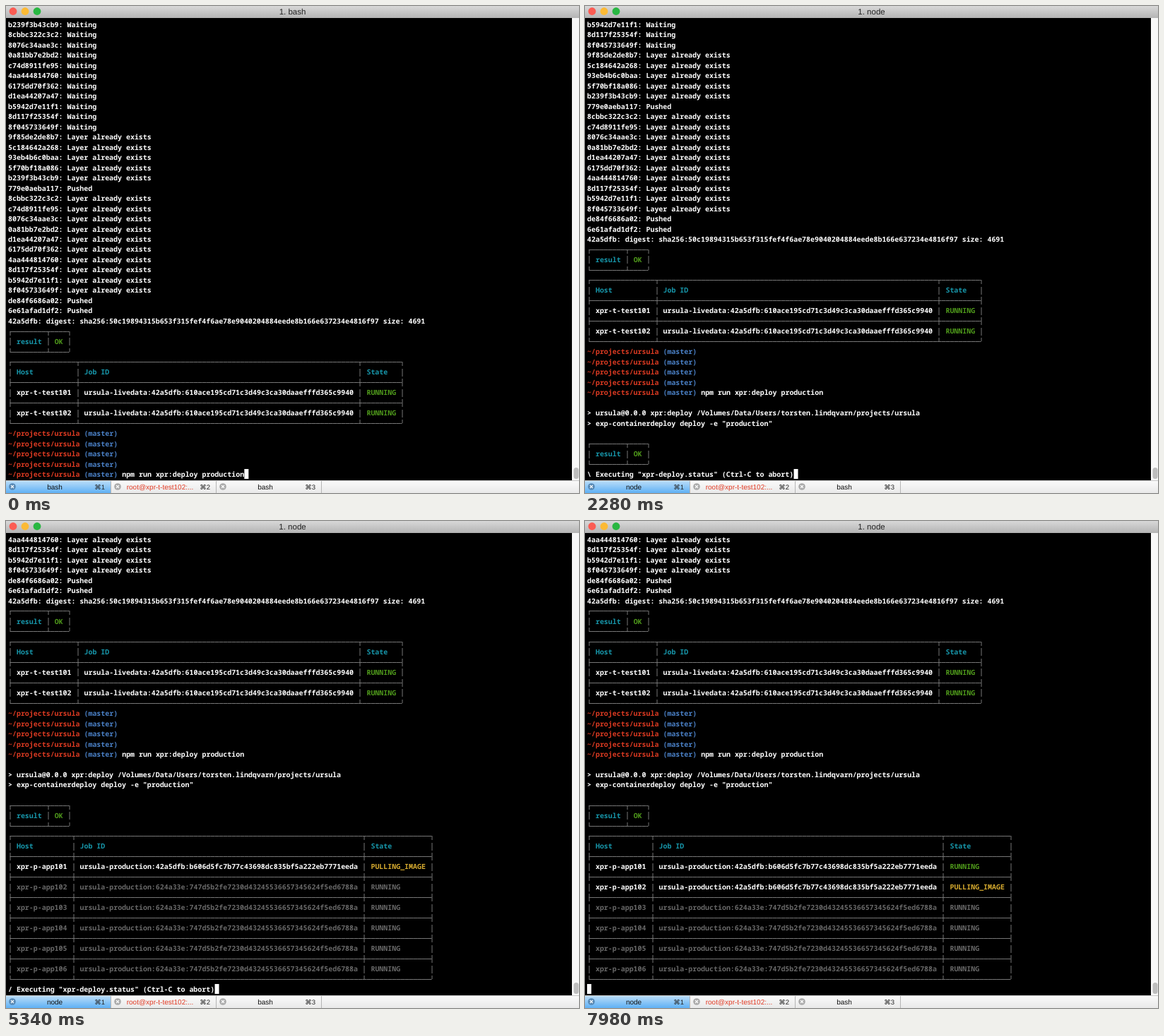
An HTML page with a canvas for the animation above (8000 ms loop, 811 by 690 pixels).

```html
<!DOCTYPE html>
<html lang="en">
<head>
<meta charset="utf-8">
<title>Terminal deploy</title>
<style>
html, body { margin: 0; width: 100%; height: 100%; overflow: hidden; background: #000; }
canvas { display: block; }
</style>
</head>
<body>
<canvas id="stage" width="811" height="690"></canvas>
<script>
const ctx = document.getElementById('stage').getContext('2d');
const LOOP = 8000, ROWS = 45, LEFT = 3, CELL = 5.97, FIRST_ROW = 26, PITCH = 14.49;
const MONO = '600 9.95px "Noto Sans Mono", "DejaVu Sans Mono", monospace';
const WHITE = '#fff', RED = '#dc3a22', BLUE = '#4a80c6', CYAN = '#1797ab',
      GREEN = '#4f9a1b', YELLOW = '#d8ac30', DIM = '#686868', GRID = '#777';

// A line is a list of [text, colour] segments.
const plain = text => [[text, WHITE]];
const layers = (ids, state) => ids.split(' ').map(id => plain(`${id}: ${state}`));

function table(rows) {
  const widths = rows[0].map((_, c) => Math.max(...rows.map(r => r[c][0].length)));
  const rule = ([left, mid, right]) =>
    [[left + widths.map(w => '─'.repeat(w + 2)).join(mid) + right, GRID]];
  const body = rows.map(row => [
    ['│', GRID],
    ...row.flatMap(([text, color], c) => [[` ${text.padEnd(widths[c])} `, color], ['│', GRID]])
  ]);
  return [
    rule('┌┬┐'),
    ...body.flatMap((line, i) => i ? [rule('├┼┤'), line] : [line]),
    rule('└┴┘')
  ];
}

const header = ['Host', 'Job ID', 'State'].map(name => [name, CYAN]);
const resultTable = table([[['result', CYAN], ['OK', GREEN]]]);
const prompt = [['~/projects/ursula ', RED], ['(master) ', BLUE]];
const command = [...prompt, ['npm run xpr:deploy production', WHITE]];

const history = [
  ...layers('b239f3b43cb9 8cbbc322c3c2 8076c34aae3c 0a81bb7e2bd2 c74d8911fe95 4aa444814760 ' +
    '6175dd70f362 d1ea44207a47 b5942d7e11f1 8d117f25354f 8f045733649f', 'Waiting'),
  ...layers('9f85de2de8b7 5c184642a268 93eb4b6c0baa 5f70bf18a086 b239f3b43cb9', 'Layer already exists'),
  ...layers('779e0aeba117', 'Pushed'),
  ...layers('8cbbc322c3c2 c74d8911fe95 8076c34aae3c 0a81bb7e2bd2 d1ea44207a47 6175dd70f362 ' +
    '4aa444814760 8d117f25354f b5942d7e11f1 8f045733649f', 'Layer already exists'),
  ...layers('de84f6686a02 6e61afad1df2', 'Pushed'),
  plain('42a5dfb: digest: sha256:50c19894315b653f315fef4f6ae78e9040204884eede8b166e637234e4816f97 size: 4691'),
  ...resultTable,
  ...table([header, ...['101', '102'].map(n => [
    ['xpr-t-test' + n, WHITE],
    ['ursula-livedata:42a5dfb:610ace195cd71c3d49c3ca30daaefffd365c9940', WHITE],
    ['RUNNING', GREEN]
  ])]),
  prompt, prompt, prompt, prompt, command
];

const banner = [
  [],
  plain('> ursula@0.0.0 xpr:deploy /Volumes/Data/Users/torsten.lindqvarn/projects/ursula'),
  plain('> exp-containerdeploy deploy -e "production"'),
  []
];

// Hosts listed in `states` run the new build; the others still run the old one.
function statusTable(...states) {
  return table([header, ...Array.from({ length: 6 }, (_, i) => {
    const state = states[i], color = state ? WHITE : DIM;
    const job = state ? '42a5dfb:b606d5fc7b77c43698dc835bf5a222eb7771eeda'
                      : '624a33e:747d5b2fe7230d43245536657345624f5ed6788a';
    return [
      ['xpr-p-app10' + (i + 1), color],
      ['ursula-production:' + job, color],
      [state || 'RUNNING', !state ? DIM : state === 'RUNNING' ? GREEN : YELLOW]
    ];
  })]);
}

const started = [...history, ...banner];
const deployed = [...started, ...resultTable];
const pulling = [...deployed, ...statusTable('PULLING_IMAGE')];
const checking = [...deployed, ...statusTable('HEALTHCHECKING')];
const nextHost = [...deployed, ...statusTable('RUNNING', 'PULLING_IMAGE')];

// Each step: start time, finished lines, and the task whose spinner is shown.
const steps = [
  [0, history.slice(0, -1), null, command],
  [180, history],
  [420, started],
  [600, started, 'deploy_async'],
  [1620, deployed, 'status'],
  [2520, pulling],
  [3540, pulling, 'status'],
  [4020, pulling],
  [5040, pulling, 'status'],
  [5520, checking],
  [6570, checking, 'status'],
  [7050, nextHost]
];

function label(text, x, y, font, color, align = 'center') {
  ctx.font = font;
  ctx.fillStyle = color;
  ctx.textAlign = align;
  ctx.fillText(text, x, y);
}

function box(x, y, w, h, color) {
  ctx.fillStyle = color;
  ctx.fillRect(x, y, w, h);
}

function disc(x, y, r, color) {
  ctx.fillStyle = color;
  ctx.beginPath();
  ctx.arc(x, y, r, 0, 7);
  ctx.fill();
}

function shade(y, h, top, bottom) {
  const g = ctx.createLinearGradient(0, y, 0, y + h);
  g.addColorStop(0, top);
  g.addColorStop(1, bottom);
  return g;
}

function drawGrid(text, x, y) {
  [...text].forEach((ch, i) => {
    const cx = Math.round(x + (i + 0.5) * CELL) - 0.5, cy = Math.round(y);
    const x0 = '┌├└│'.includes(ch) ? cx : x + i * CELL;
    const x1 = '┐┤┘│'.includes(ch) ? cx : x + (i + 1) * CELL;
    if (ch !== '│') box(x0, cy, x1 - x0, 1, GRID);
    const up = '│├┼┤└┴┘'.includes(ch) ? 5 : 0, down = '│├┼┤┌┬┐'.includes(ch) ? 6 : 0;
    if (up || down) box(cx, cy - up, 1, up + down, GRID);
  });
}

function drawLine(line, row) {
  const y = FIRST_ROW + row * PITCH;
  let x = LEFT;
  for (const [text, color] of line) {
    if (color === GRID) drawGrid(text, x, y);
    else label(text, x, y + 3.7, MONO, color, 'left');
    x += text.length * CELL;
  }
  return x;
}

function drawTab(x, title, number, active, color = '#111') {
  box(x, 673, 148, 17, active ? shade(673, 17, '#b9dcf8', '#5fb1f5') : shade(673, 17, '#fafafa', '#e9e9e9'));
  box(x + 148, 673, 1, 17, '#b5b5b5');
  disc(x + 9, 681, 4.8, active ? '#5688b4' : '#aaa');
  ctx.strokeStyle = '#fff';
  ctx.lineWidth = 1.2;
  ctx.beginPath();
  ctx.moveTo(x + 7, 679); ctx.lineTo(x + 11, 683);
  ctx.moveTo(x + 11, 679); ctx.lineTo(x + 7, 683);
  ctx.stroke();
  label(title, x + 69, 685, '10px "Liberation Sans", Arial, sans-serif', color);
  label('⌘' + number, x + 140, 685, '9.5px "Liberation Sans", "DejaVu Sans", sans-serif', '#222', 'right');
}

function drawWindow(program) {
  box(0, 0, 811, 17, shade(0, 17, '#d8d8d8', '#b4b4b4'));
  ['#fb5c53', '#fcba35', '#29b742'].forEach((color, i) => disc(10 + i * 17, 7.5, 5.4, color));
  label('1. ' + program, 405.5, 12, '11.5px "Liberation Sans", Arial, sans-serif', '#222');
  box(801, 17, 10, 656, '#f8f8f8');
  ctx.fillStyle = '#bdbdbd';
  ctx.beginPath();
  ctx.roundRect(803.5, 654, 7, 16, 3.5);
  ctx.fill();
  box(0, 673, 811, 17, shade(673, 17, '#fafafa', '#e9e9e9'));
  box(0, 672, 811, 1, '#c8c8c8');
  drawTab(0, program, 1, true);
  drawTab(149, 'root@xpr-t-test102:...', 2, false, '#e23a24');
  drawTab(298, 'bash', 3, false);
}

function draw(t) {
  const [start, done, task, input] = steps.findLast(step => step[0] <= t);
  const spin = '|/-\\'[Math.floor((t - start) / 60) % 4];
  const last = input || (task ? plain(`${spin} Executing "xpr-deploy.${task}" (Ctrl-C to abort)`) : []);

  box(0, 0, 811, 690, '#000');
  let cursor = LEFT;
  [...done, last].slice(-ROWS).forEach((line, row) => { cursor = drawLine(line, row); });
  box(cursor, 656, 6, 14, '#fff');
  drawWindow(t < 180 ? 'bash' : 'node');
}

ctx.textRendering = 'geometricPrecision';
const origin = performance.now();
function tick() {
  draw((performance.now() - origin) % LOOP);
  requestAnimationFrame(tick);
}
tick();
</script>
</body>
</html>
```
